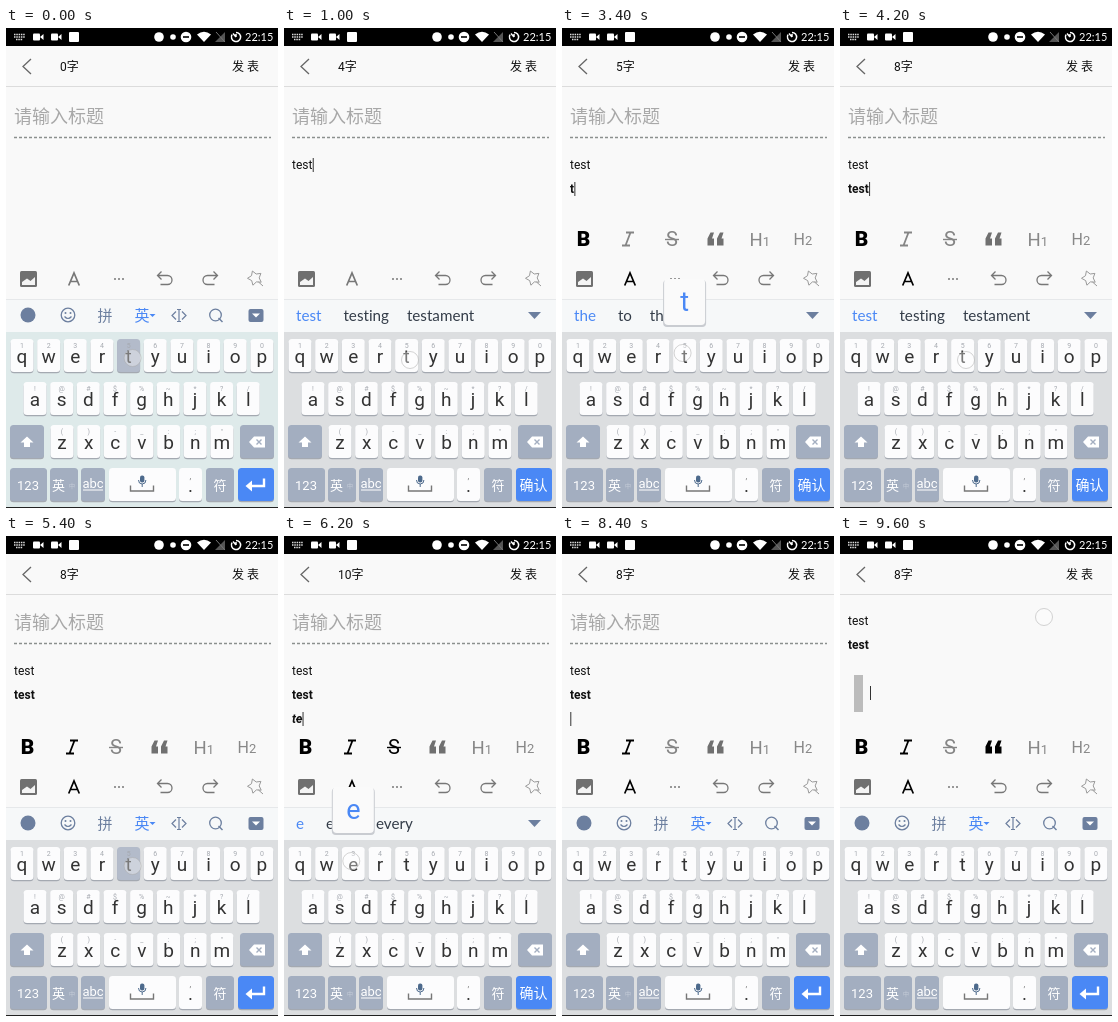
Recreate the animation shown at these times as an HTML page. Size 272 px wide and 480 px high, loop 9800 ms.

```html
<!DOCTYPE html>
<html lang="zh-CN">
<head>
<meta charset="utf-8">
<style>
  html, body { margin: 0; height: 100%; overflow: hidden; background: #f9f9f9; }
  svg {
    display: block; width: 100vw; height: 100vh; font-variant-ligatures: none;
    font-family: Roboto, "Noto Sans CJK SC", "Noto Sans CJK", sans-serif;
  }
</style>
</head>
<body>
<svg id="stage" viewBox="0 0 272 480"></svg>
<script>
const STEP = 200, BLUE = '#4a88f5', SLATE = '#6c7f9f', KEY = '#a3aec0';
const stage = document.getElementById('stage');

// Drawing helpers
const text = (x, y, size, fill, str, more = '') =>
  `<text x="${x}" y="${y}" font-size="${size}" fill="${fill}" ${more}>${str}</text>`;
const mid = (x, y, size, fill, str, more = '') => text(x, y, size, fill, str, 'text-anchor="middle" ' + more);
const box = (x, y, w, h, fill, r = 0) =>
  `<rect x="${x}" y="${y}" width="${w}" height="${h}" rx="${r}" fill="${fill}"/>`;
const line = (d, stroke, width = 1.3, more = '') =>
  `<path d="${d}" fill="none" stroke="${stroke}" stroke-width="${width}" ${more}/>`;
const shape = (d, fill) => `<path d="${d}" fill="${fill}"/>`;
const disc = (x, y, r, fill, more = '') => `<circle cx="${x}" cy="${y}" r="${r}" fill="${fill}" ${more}/>`;
const ring = (x, y, r, stroke, width = 1.3) => disc(x, y, r, 'none', `stroke="${stroke}" stroke-width="${width}"`);

// Letter keys, by row
const keys = {};
[['qwertyuiop', 16, 311, '1234567890'], ['asdfghjkl', 29, 354, '!@#$%~*?/'], ['zxcvbnm', 56, 397, '()-_:;"']]
  .forEach(([letters, x, y, hints]) => [...letters].forEach((letter, i) => {
    keys[letter] = { x: x + i * 26.65, y, hint: hints[i] };
  }));

const spots = {
  enter: [249, 457], erase: [251, 414], A: [68, 254],
  B: [22, 211], I: [66, 211], S: [110, 211], quote: [153, 211]
};

const words = {
  t: 'the to this', te: 'te test tell', tes: 'test tests tested', test: 'test testing testament',
  e: 'e even every', ea: 'each easy early', eat: 'eat eaten eating EATS'
};

// Storyboard: one state per step
const states = [];
let now = { count: 0, lines: ['', '', ''], row: 0, word: '', on: '', open: false, scroll: 0 };
const step = change => states.push(now = { ...now, tap: null, press: '', pop: '', ...change });
const setLine = str => now.lines.map((old, i) => i === now.row ? str : old);
const type = letters => [...letters].forEach(pop => step({
  pop, word: now.word + pop, count: now.count + 1, lines: setLine(now.lines[now.row] + pop)
}));
const tap = (name, change) => step({ tap: spots[name], ...change });
const typeTest = () => {
  step({ press: 't' });
  type('test');
  step({ tap: [126, 332] });
  tap('enter');
  step({ word: '' });
  tap('enter');
};

typeTest();
step({ row: 1 });
step();
tap('A');
step({ open: true });
tap('B');
step({ on: 'B' });
step();
typeTest();
tap('I', { row: 2, scroll: 2 });
step({ on: 'BI' });
step({ press: 't' });
type('t');
tap('S', { word: '' });
step({ on: 'BIS' });
type('e');
step();
type('a');
step({ pop: 't', word: 'eat', count: 12 });
tap('enter', { lines: setLine('teat') });
step({ word: '' });
for (let n = 3; n >= 0; n--) tap('erase', { lines: setLine('teat'.slice(0, n)), count: 8 + n });
tap('S');
step({ on: 'BI' });
tap('quote');
step({ on: 'BIQ' });
[2, 18, 36, 52].forEach(scroll => step({ scroll, tap: [204, 133 - scroll] }));

function statusBar() {
  const camera = x => box(x, 5.5, 7, 7, '#fff', 1) + shape(`M${x + 7} 9l3.5-3v6z`, '#fff');
  return box(0, 0, 272, 18, '#000') +
    line('M8 6.5h11M8 9h11M10 11.5h7', '#ddd', 1.3, 'stroke-dasharray="1.5 .8"') +
    camera(27) + camera(45) + box(63, 4, 10, 10, '#fff', 1) +
    disc(153, 9, 4.8, '#fff') + disc(167, 9, 2.8, '#fff') +
    disc(180, 9, 5.3, '#fff') + box(177, 8.2, 6, 1.6, '#000') +
    shape('M191 6.5Q198 1 205 6.5L198 14z', '#fff') +
    shape('M219 4v10h-10z', '#555') + line('M210 4l9 10', '#777', 1) +
    line('M230 4.4a4.6 4.6 0 1 1-4 2.300M230 9l-3-3.5M230 9v-3', '#fff', 1.5) +
    text(239, 13, 11, '#fff', '22:15', 'font-family="Lato, sans-serif"');
}

function header(s) {
  return box(0, 18, 272, 40, '#f9f9f9') + box(0, 58, 272, 1, '#dcdcdc') +
    line('M25 31l-8 7.5 8 7.5', '#666') +
    text(54, 43, 12, '#111', s.count + '字') + text(226, 43, 12, '#111', '发 表');
}

function page(s) {
  const looks = ['', 'font-weight="700"', 'font-weight="700" font-style="italic"'];
  const strike = s.on.includes('S') ? 'line-through' : 'none';
  return `<g transform="translate(0 ${-s.scroll})">` +
    text(8, 95, 18, '#a8a8a8', '请输入标题') +
    line('M8 109.5H265', '#8b908e', 1.4, 'stroke-dasharray="3 2"') +
    s.lines.map((str, i) => text(8, 141 + i * 24, 12, '#111',
      str.slice(0, 1) + `<tspan text-decoration="${i === 2 ? strike : 'none'}">${str.slice(1)}</tspan>`,
      `id="line${i}" ` + looks[i])).join('') +
    (s.on.includes('Q') ? box(14, 191, 9, 37, '#bcbcbc') : '') +
    '<path id="caret" stroke="#333"/></g>';
}

function formatBar(s) {
  const ink = (name, idle = '#858585') => s.on.includes(name) ? '#000' : idle;
  const mark = 'h-6.5v-7l3-6h3.5l-2 6h2z';
  const arrow = 'M155.5 243.5l-4 4 4 4M151.5 247.5h10a4.5 4.5 0 0 1 0 9h-7';
  const rowTwo = mid(21.5, 218, 21, ink('B'), 'B', 'font-weight="900"') +
    line('M64 204.5h8M60 217.5h8M68.5 204.5l-5 13', ink('I'), 1.8) +
    mid(110, 218, 20, ink('S'), 'S') + line('M103 211.5h14', ink('S'), 1.4) +
    shape('M152 217.5' + mark + 'M161.5 217.5' + mark, ink('Q', '#707070')) +
    text(187.5, 217.5, 18.5, '#888', 'H<tspan font-size="13">1</tspan>') +
    text(231.5, 216.5, 16, '#888', 'H<tspan font-size="13">2</tspan>');
  return box(0, s.open ? 192 : 232, 272, 80, '#f9f9f9') + (s.open ? rowTwo : '') +
    box(14, 243, 17, 16, '#707070', 1.5) + shape('M16 257v-3l5-3.5 3.5 2.5 4.5-4v8z', '#f4f4f4') +
    line('M62.7 257.5L68 245l5.3 12.5M64.7 253.5h6.6', s.open ? '#000' : '#777', 1.7) +
    [109, 113, 117].map(x => disc(x, 251, 1, '#777')).join('') +
    line(arrow, '#777') + `<g transform="translate(363 0) scale(-1 1)">${line(arrow, '#777')}</g>` +
    line('M246.4 243l3.8 3 4.7-.6-1.7 4.5 2 4.3-4.8-.3-3.5 3.3-1.2-4.6-4.2-2.3 4-2.6zM252.5 254l4.500 4', '#999', 1);
}

function suggestBar(s) {
  const base = box(0, 271, 272, 33, '#f6f8f9') + box(0, 271, 272, 1, '#e6e8ea');
  if (s.word) {
    const spans = words[s.word].split(' ').map((w, i) =>
      `<tspan ${i ? `dx="${i === 1 ? 22 : 18}"` : `fill="${BLUE}"`}>${w}</tspan>`).join('');
    return base + text(12, 293, 15.2, '#333c48', spans, 'font-family="Lato, sans-serif"') +
      box(232, 273, 40, 30, '#f6f8f9') + shape('M244 284h13l-6.5 7z', SLATE);
  }
  return base + disc(22, 287, 7.5, SLATE) +
    ring(62, 287, 6.8, SLATE) + disc(59.5, 285, 1, SLATE) + disc(64.5, 285, 1, SLATE) +
    line('M58.5 288.5q3.5 4 7 0', SLATE, 1.2) +
    mid(99, 293, 15, SLATE, '拼') + mid(136, 293, 15, BLUE, '英') + shape('M143.5 286h6l-3 3z', BLUE) +
    line('M170 283.5l-4 4 4 4M176 283.5l4 4-4 4M171 281.5h4M171 293.5h4M173 281.5v12', SLATE, 1.2) +
    ring(209.5, 287, 5.8, SLATE) + line('M212.5 290l4 4', SLATE, 1.5) +
    box(242.5, 281, 15, 13, SLATE, 2) + shape('M246 285.5h8l-4 4z', '#fff');
}

function keyboard(s) {
  const key = (x, y, w, fill) => box(x, y + 1.3, w, 33, '#a4a9b1', 3.5) + box(x, y, w, 33, fill, 3.5);
  const letters = Object.entries(keys).map(([letter, k]) =>
    key(k.x - 11.5, k.y, 23, s.press === letter ? '#b3bbca' : '#fcfcfd') +
    mid(k.x, k.y + 9, 7, '#a5a9b0', k.hint) + mid(k.x, k.y + 24, 19, '#333', letter)).join('');
  const enter = s.word ? mid(249.5, 462, 14, '#fff', '确认')
    : line('M258 450.5v7.500h-14', '#fff', 2.4) + shape('M246 452.5v11l-6.5-5.5z', '#fff');
  return box(0, 304, 272, 176, s === states[0] ? '#deeaea' : '#dcdee0') + box(0, 479, 272, 1, '#222') + letters +
    key(4, 397, 34, KEY) + shape('M21 408.5l6.5 6h-3.5v4.5h-6v-4.5h-3.5z', '#fff') +
    key(234, 397, 34, KEY) + shape('M243 414l5-5.500h11v11h-11z', '#fff') +
    line('M250.5 411.5l5 5M255.5 411.5l-5 5', KEY, 1.4) +
    key(4, 440, 37, KEY) + mid(22, 461.5, 13, '#fff', '123') +
    key(44, 440, 28, KEY) + text(46, 461.5, 13, '#fff', '英') + mid(66, 460, 6, '#c8cfda', '中') +
    key(75, 440, 24, KEY) + mid(87, 459.5, 13, '#fff', 'abc') + box(77, 461.5, 20, 1, '#fff') +
    key(103, 440, 67, '#fcfcfd') + line('M124.5 457.5v5.5h23v-5.5', '#777', 1.4) +
    box(134, 447.5, 4.4, 7, '#4d6a8c', 2) + line('M132.5 452q0 4 3.7 4t3.7-4M136.2 456v3', '#4d6a8c', 1) +
    key(173, 440, 23, '#fcfcfd') + mid(184.5, 451, 9, '#888', ',') + mid(184.5, 464, 19, '#333', '.') +
    key(200, 440, 28, KEY) + mid(214, 461.5, 13, '#fff', '符') +
    key(232, 440, 36, BLUE) + enter;
}

function touch(s) {
  const k = keys[s.press || s.pop];
  const at = s.tap || (k && (s.press ? [k.x + 4, k.y + 19] : [k.x - 2, k.y + 14]));
  const bubble = s.pop ? box(k.x - 21.5, k.y - 59, 43, 47, '#c9ccd1', 4) +
    box(k.x - 20.5, k.y - 60, 41, 46, '#fafafa', 4) + mid(k.x, k.y - 28, 27, BLUE, s.pop) : '';
  return bubble + (at ? disc(...at, 8.5, '#fff', 'fill-opacity=".35" stroke="#aaa" stroke-opacity=".5"') : '');
}

function render(s) {
  stage.innerHTML = box(0, 0, 272, 480, '#f9f9f9') + page(s) + statusBar() + header(s) +
    formatBar(s) + suggestBar(s) + keyboard(s) + touch(s);
  if (s.press) return;
  const quoted = s.on.includes('Q');
  const x = quoted ? 30.5 : 8.8 + document.getElementById('line' + s.row).getComputedTextLength();
  document.getElementById('caret').setAttribute('d', `M${x} ${quoted ? 202 : 130 + s.row * 24}v14`);
}

let shown = -1;
function tick() {
  const index = Math.floor(performance.now() / STEP) % states.length;
  if (index !== shown) render(states[shown = index]);
  requestAnimationFrame(tick);
}
tick();
</script>
</body>
</html>
```
